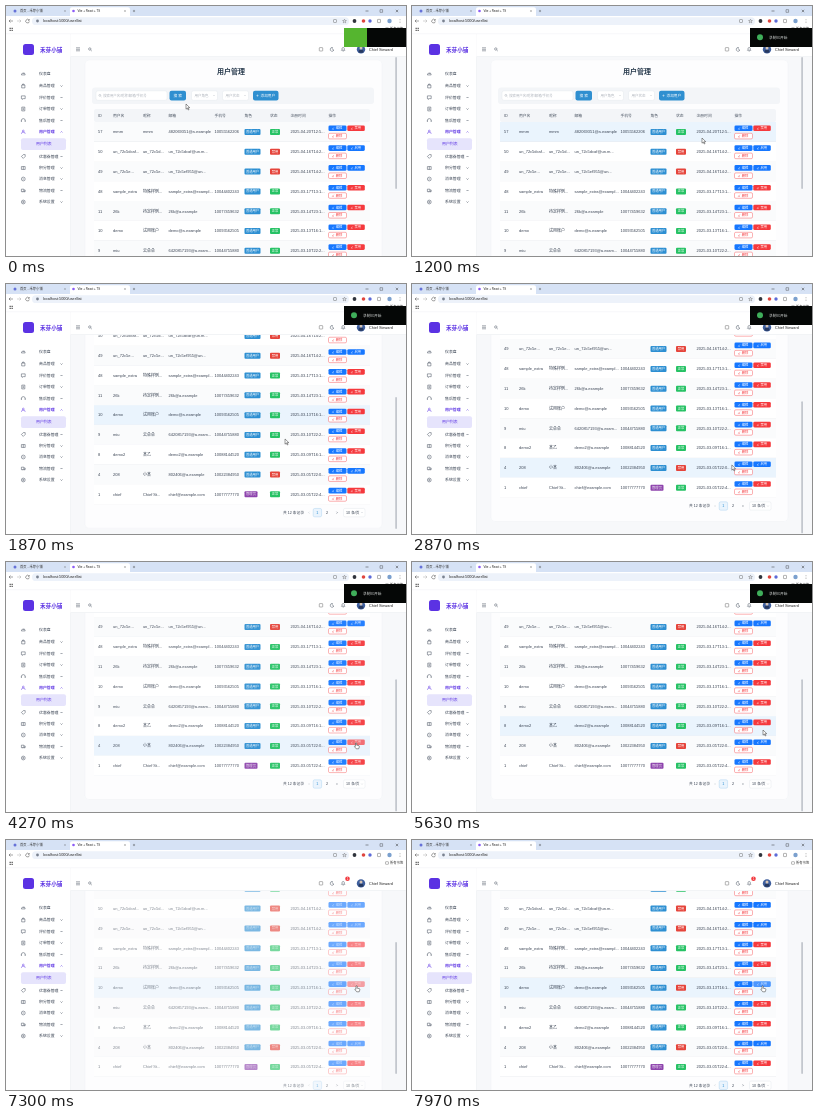
An HTML page with a canvas that plays this animation: 400 px wide and 250 px high, repeating every 8000 ms.

```html
<!DOCTYPE html>
<html lang="zh">
<head>
<meta charset="utf-8">
<title>用户管理</title>
<style>
html, body { margin: 0; width: 100%; height: 100%; overflow: hidden; background: #fff; }
canvas { display: block; width: 100vw; height: 100vh; }
</style>
</head>
<body>
<canvas id="stage"></canvas>
<script>
const canvas = document.getElementById('stage');
const ctx = canvas.getContext('2d');
const LOOP = 8000, W = 400, H = 250;
const FONT = '"Liberation Sans", "Noto Sans CJK SC", "Noto Sans CJK", sans-serif';
const BLUE = '#1677ff', RED = '#f5393d', PURPLE = '#5b32e3', INK = '#374151', GRAY = '#9aa1ac';
const ROW0 = 126, PITCH = 19.8, VIEW_TOP = 51;
const COLUMNS = [92, 107, 136.9, 162.5, 208.5, 238.5, 264, 284.5, 322.5];
const HEADINGS = ['ID', '用户名', '昵称', '邮箱', '手机号', '角色', '状态', '注册时间', '操作'];
const USERS = [
  ['57', 'mmm', 'mmm', '482069351@a.example', '10055562206', '04-20T12:5'],
  ['50', 'un_72c5dcaf...', 'un_72c5d...', 'un_72c5dcaf@un.m...', '', '04-16T14:2'],
  ['49', 'un_72c5e...', 'un_72c5e...', 'un_72c5ef955@un...', '', '04-16T14:2'],
  ['48', 'sample_extra', '特殊样例...', 'sample_extra@exampl...', '10044402243', '03-17T13:1'],
  ['11', '26k', '待定样例...', '26k@a.example', '10077459632', '03-14T23:1'],
  ['10', 'demo', '试用账户', 'demo@a.example', '10093562505', '03-13T16:1'],
  ['9', 'miu', '云朵朵', '6420857193@a.exam...', '10044755880', '03-10T22:2'],
  ['8', 'demo2', '某乙', 'demo2@a.example', '10088144520', '03-09T16:1'],
  ['4', '208', '小某', '802406@a.example', '10022384950', '03-05T22:0'],
  ['1', 'chief', 'Chief St...', 'chief@example.com', '10077777770', '03-05T22:4'],
];
const MENU = [
  ['仪表盘', 67.5], ['商品管理', 80], ['评价管理', 91.5], ['订单管理', 103], ['售后管理', 114.5],
  ['用户管理', 126], ['优惠券管理', 150.5], ['积分管理', 162], ['消息管理', 173], ['物流管理', 184.5], ['系统设置', 196],
];
const ICONS = [
  'M-2 1.5A2 2 0 1 1 2 1.5ZM0 .5L1-.7', 'M-1.7-1H1.7V2H-1.7ZM-.8-1V-2H.8V-1', 'M-2-1.7H2V1.2H0L-1 2V1.2H-2Z',
  'M-1.6-2H1.6V2H-1.6ZM-.8-.7H.8M-.8.6H.8', 'M-2 1V0A2 2 0 0 1 2 0V1M-2 0V1.4M2 0V1.4', 'M-1-1A1 1 0 1 1 1-1A1 1 0 1 1-1-1M-2 2A2 2 0 0 1 2 2',
  'M-2 0L0-2H2V0L0 2Z', 'M-2-1.5H2V1.5H-2ZM0-1.5V1.5', 'M-2 0A2 2 0 1 1 2 0A2 2 0 1 1-2 0M-.8 0H.8',
  'M-2-1.4H.6V1.2H-2ZM.6-.5H2V1.2H.6M-1 1.2V1.8M1 1.2V1.8', 'M-2 0A2 2 0 1 1 2 0A2 2 0 1 1-2 0M-.7 0A.7.7 0 1 1 .7 0A.7.7 0 1 1-.7 0',
].map(d => new Path2D(d));

const SCROLL = [[0, 0], [1500, 0], [1940, 100.5], [5850, 100.5], [6250, 77.2]];
const CURSOR_X = [[0, 180], [500, 196], [1200, 290], [1550, 281], [1900, 279], [2500, 309], [2700, 312], [3250, 346], [3400, 350],
  [5250, 350], [5600, 351], [5850, 351], [6400, 332], [6600, 332], [7050, 350.5]];
const CURSOR_Y = [[0, 98], [500, 104], [1200, 132], [1550, 153], [1900, 155], [2500, 181], [5250, 181], [5550, 168],
  [5850, 168], [6400, 183], [6600, 183], [7050, 146]];
const HOVERED = [[0, -1], [850, 0], [1580, 5], [2050, 7], [2330, 8], [5420, 7], [6760, 6], [6900, 5]];
const LOADS = [[3600, 4060], [4950, 5250], [7150, 7600]];

const clamp = v => Math.max(0, Math.min(1, v));
const ease = v => v * v * (3 - 2 * v);
const step = (keys, t) => keys.filter(k => k[0] <= t).pop()[1];
function tween(keys, t) {
  const i = keys.findIndex(k => k[0] > t);
  if (i < 0) return keys[keys.length - 1][1];
  const [t0, a] = keys[i - 1], [t1, b] = keys[i];
  return a + (b - a) * ease((t - t0) / (t1 - t0));
}

function box(x, y, w, h, fill, radius = 0, stroke) {
  ctx.beginPath();
  ctx.roundRect(x, y, w, h, radius);
  if (fill) { ctx.fillStyle = fill; ctx.fill(); }
  if (stroke) { ctx.strokeStyle = stroke; ctx.lineWidth = .4; ctx.stroke(); }
}
function dot(x, y, r, fill) {
  ctx.beginPath();
  ctx.arc(x, y, r, 0, 7);
  ctx.fillStyle = fill;
  ctx.fill();
}
function text(str, x, y, size = 4, color = INK, align = 'left', weight = 'normal') {
  ctx.font = `${weight} ${size}px ${FONT}`;
  ctx.textAlign = align;
  ctx.textBaseline = 'middle';
  ctx.fillStyle = color;
  ctx.fillText(str, x, y + size * .05);
}
function icon(path, x, y, color = '#4b5563', scale = 1, width = .5) {
  ctx.save();
  ctx.translate(x, y);
  ctx.scale(scale, scale);
  ctx.strokeStyle = color;
  ctx.lineWidth = width;
  ctx.stroke(typeof path === 'string' ? new Path2D(path) : path);
  ctx.restore();
}
const CHEVRON = 'M-1-.5L0 .5L1-.5', CROSS = 'M-1-1L1 1M1-1L-1 1', PLUS = 'M-1.4 0H1.4M0-1.4V1.4';
const LENS = 'M-1.4-.3A1.2 1.2 0 1 1 1-.3A1.2 1.2 0 1 1-1.4-.3M.7.7L1.8 1.8';

function browser() {
  box(0, 0, W, 10, '#d6e2f5');
  box(64, 1.2, 60, 10, '#fff', 2);
  dot(9, 5, 1.5, '#6672d8');
  text('首页 - 禾芽小铺', 14, 5, 3.3, '#333');
  dot(67.5, 5, 1.3, '#8b5cf6');
  text('Vite + React + TS', 71.5, 5, 2.9, '#222');
  icon(CROSS, 59, 5, '#555', .7);
  icon(CROSS, 119, 5, '#333', .7);
  icon(PLUS, 128, 5, '#333', .8);
  icon('M-1.5 0H1.5', 361, 5, '#333');
  box(374, 3.7, 2.6, 2.6, null, 0, '#333');
  icon(CROSS, 391, 5, '#333', 1.2, .4);
  box(0, 10, W, 18, '#fff');
  box(26, 11.3, 317, 7.8, '#edf2fa', 4);
  icon('M2 0H-2M-.5-1.5L-2 0L-.5 1.5', 5, 15, '#444');
  icon('M-2 0H2M.5-1.5L2 0L.5 1.5', 13, 15, '#aaa');
  icon('M1.4-1A1.8 1.8 0 1 0 1.8.4M1.8-2V-.7H.5', 21.5, 15, '#444');
  dot(31.5, 15, 1.4, '#7a8290');
  text('localhost:5000/user/list', 37, 15, 3.8, '#222');
  box(327.5, 13.5, 3, 3, null, .5, '#555');
  icon('M0-1.8L.6-.5L1.9-.4L.9.5L1.2 1.8L0 1.1L-1.2 1.8L-.9.5L-1.9-.4L-.6-.5Z', 338.5, 15, '#555', 1, .4);
  dot(348.5, 15, 1.9, '#30343c');
  dot(357.5, 15, 1.8, '#df453e');
  dot(364, 15, 1.7, '#5d6bd8');
  box(371.5, 13.4, 3, 3.2, null, .4, '#444');
  dot(383.5, 15, 2.2, '#7ba0ce');
  for (const dy of [-1.4, 0, 1.4]) dot(394, 15 + dy, .35, '#444');
  for (const dx of [0, 2]) for (const dy of [0, 2]) box(3.5 + dx, 21.7 + dy, 1.4, 1.4, '#666');
  box(379.5, 21.7, 3, 2.6, null, .4, '#555');
  text('所有书签', 384, 23.2, 3.3, '#333');
  box(0, 27.8, W, .4, '#e5e8ed');
}

function sidebar() {
  box(0, 28.2, 64, 222, '#fff');
  box(64, 28.2, .4, 222, '#e3e6ec');
  box(17, 38, 11, 11, PURPLE, 2.5);
  text('禾芽小铺', 34, 44, 5.6, PURPLE, 'left', 'bold');
  box(15, 132.3, 45, 11.6, '#e6e4fc', 2);
  text('用户列表', 30, 138.2, 3.9, PURPLE);
  MENU.forEach(([label, y], i) => {
    const active = i === 5, color = active ? PURPLE : INK;
    icon(ICONS[i], 17.3, y, color, .95);
    text(label, 33, y, 3.9, color, 'left', active ? 'bold' : 'normal');
    if (i) icon(CHEVRON, 55.5, y, color, active ? -1 : 1);
  });
}

function header() {
  box(64.4, 28.2, 335.6, VIEW_TOP - 28.2, '#fff');
  box(64.4, VIEW_TOP - .4, 335.6, .4, '#e6e9ee');
  icon('M-2-1.5H2M-2 0H2M-2 1.5H2', 72, 43.3);
  icon(LENS, 84, 43.3);
  box(313.3, 41.6, 3.4, 3.4, null, .5, '#444');
  icon('M.5-1.8A1.9 1.9 0 1 0 1.9.7A1.6 1.6 0 0 1 .5-1.8Z', 326, 43.3);
  icon('M-1.8 1H1.8L1.2.3V-.6A1.2 1.2 0 0 0-1.2-.6V.3ZM-.5 1.9H.5', 337.2, 43.3);
  dot(341.5, 38.8, 2.3, '#f23b40');
  text('1', 341.5, 38.8, 3, '#fff', 'center');
  dot(355, 43.4, 4.2, '#3f5f9d');
  dot(355, 42, 1.5, '#d6c4b5');
  box(352.6, 44, 4.8, 2.8, '#27395f', 1.4);
  text('Chief Steward', 363, 43.5, 3.8, '#222');
}

function filters() {
  text('用户管理', 225, 66.2, 7, '#2c3e50', 'center', 'bold');
  box(86, 81.5, 282, 16.5, '#f3f5f8', 3);
  box(90, 84.8, 71, 9.6, '#fff', 2, '#dfe3e8');
  icon(LENS, 94, 89.6, GRAY, .8);
  text('搜索用户名/昵称/邮箱/手机号', 97.2, 89.6, 3.4, '#b1b6be');
  box(163.5, 84.8, 16.5, 9.6, '#2f8fd0', 2);
  text('搜 索', 171.8, 89.6, 3.8, '#fff', 'center');
  [[185.5, '用户角色'], [216.5, '用户状态']].forEach(([x, label]) => {
    box(x, 84.8, 26, 9.6, '#fff', 2, '#dfe3e8');
    text(label, x + 3, 89.6, 3.5, '#b1b6be');
    icon(CHEVRON, x + 22.5, 89.6, '#b1b6be', .8);
  });
  box(247, 84.8, 25.5, 9.6, '#2f8fd0', 2);
  icon(PLUS, 251.5, 89.6, '#fff', .8);
  text('添加用户', 254.5, 89.6, 3.7, '#fff');
}

function tag(label, x, y, w, color) {
  box(x, y - 3, w, 6, color, 1);
  text(label, x + w / 2, y, 3.3, '#fff', 'center');
}
function button(label, x, y, w, color, mouse, outlined) {
  const hot = mouse.x > x && mouse.x < x + w && Math.abs(mouse.y - y) < 2.9;
  ctx.save();
  if (hot) { mouse.hand = true; ctx.globalAlpha *= .75; }
  box(x, y - 2.8, w, 5.6, outlined ? '#fff' : color, 1.3, outlined && color);
  const ink = outlined ? color : '#fff';
  icon('M-1 1L1-1M-1 1.2H1', x + 4.6, y, ink, .8);
  text(label, x + 7.2, y, 3.3, ink);
  ctx.restore();
}

function isEnabled(index, t) {
  if (index === 1 || index === 2) return false;
  if (index === 8) return t >= LOADS[0][1] && t < LOADS[1][1];
  return index !== 5 || t < LOADS[2][1];
}

function table(t, mouse) {
  const hovered = step(HOVERED, t);
  box(88, 103, 276, 13.1, '#f3f5f8', 2);
  HEADINGS.forEach((label, i) => text(label, COLUMNS[i], 109.7, 3.8, '#4b5563'));
  USERS.forEach(([id, name, nick, mail, phone, date], i) => {
    const y = ROW0 + i * PITCH, enabled = isEnabled(i, t);
    box(88, y - PITCH / 2, 276, PITCH, i === hovered ? '#eaf4fd' : i % 2 ? '#fff' : '#fafbfc');
    box(88, y + PITCH / 2 - .3, 276, .3, '#e9ecf0');
    [id, name, nick, mail, phone].forEach((value, c) => text(value, COLUMNS[c], y, 4));
    text(`2025-${date}...`, COLUMNS[7], y, 4);
    if (i === 9) tag('管理员', 238.5, y, 13, '#8e44ad');
    else tag('普通用户', 238.5, y, 16, '#2d8fd2');
    tag(enabled ? '正常' : '禁用', 264, y, 10, enabled ? '#27c265' : '#e5443b');
    button('编辑', 322.5, y - 3.7, 18, BLUE, mouse);
    button(enabled ? '禁用' : '启用', 341.3, y - 3.7, 17.5, enabled ? RED : BLUE, mouse);
    button('删除', 322.5, y + 4.1, 18, RED, mouse, true);
  });
  const y = 322.5;
  text('共 12 条记录', 277, y, 3.7);
  icon('M.5-1L-.5 0L.5 1', 303, y, '#b8bec7', .9);
  box(307.2, y - 4.2, 8.4, 8.4, '#eaf4fd', 1.5, '#9ccbee');
  text('1', 311.4, y, 3.8, '#2d8fd2', 'center');
  text('2', 321, y, 3.8, INK, 'center');
  icon('M-.5-1L.5 0L-.5 1', 331, y, INK, .9);
  box(337.5, y - 4.2, 21.5, 8.4, '#fff', 1.5, '#dfe3e8');
  text('10 条/页', 340, y, 3.7);
  icon(CHEVRON, 356, y, GRAY, .7);
}

function tableOpacity(t) {
  return 1 - .5 * Math.max(...LOADS.map(([a, b]) => clamp((t - a) / 200) * (1 - clamp((t - b) / 240))));
}

function content(t, mouse) {
  const scroll = tween(SCROLL, t);
  ctx.save();
  ctx.beginPath();
  ctx.rect(64.4, VIEW_TOP, 335.6, H - VIEW_TOP);
  ctx.clip();
  box(64.4, VIEW_TOP, 335.6, 199, '#f7f8fa');
  ctx.translate(0, -scroll);
  box(79, 54, 297, 284, '#fdfdfe', 4, '#eceff3');
  filters();
  ctx.globalAlpha = tableOpacity(t);
  mouse.y += scroll;
  table(t, mouse);
  mouse.y -= scroll;
  ctx.restore();
  box(389.2, VIEW_TOP + scroll * .66, 1.8, 132, '#c3c7ce', .9);
}

function recorderNotice(t) {
  const x = 338 + 62 * ease(clamp((t - 5850) / 300));
  if (x >= W) return;
  box(x, 22, 62, 19, '#050706');
  const green = 23 * (1 - ease(clamp((t - 30) / 350)));
  if (green > 0) box(x, 22, green, 19, '#55b52f');
  ctx.save();
  ctx.globalAlpha = clamp((t - 300) / 200);
  dot(x + 10, 31.3, 3, '#3fae5a');
  text('录制已开始', x + 19, 31.3, 3.7, '#dcdfdd');
  ctx.restore();
}

function pointer({ x, y, hand }) {
  const arrow = 'M0 0V5.2L1.3 4L2.2 6L3 5.6L2.1 3.7H3.8Z';
  const glove = 'M-.5 0Q.2-.6.7 0V2.2L3 2.7Q3.5 3 3.3 4L2.7 5.8H.2L-1.7 3.4Q-1.4 2.7-.5 3.3Z';
  const shape = new Path2D(hand ? glove : arrow);
  ctx.save();
  ctx.translate(x, y);
  ctx.fillStyle = '#fff';
  ctx.strokeStyle = '#333';
  ctx.lineWidth = .5;
  ctx.fill(shape);
  ctx.stroke(shape);
  ctx.restore();
}

function draw() {
  const t = performance.now() % LOOP;
  const ratio = devicePixelRatio || 1;
  const width = Math.round(innerWidth * ratio), height = Math.round(innerHeight * ratio);
  if (canvas.width !== width || canvas.height !== height) Object.assign(canvas, { width, height });
  ctx.setTransform(width / W, 0, 0, height / H, 0, 0);
  const mouse = { x: tween(CURSOR_X, t), y: tween(CURSOR_Y, t), hand: false };
  box(0, 0, W, H, '#fff');
  content(t, mouse);
  browser();
  sidebar();
  header();
  recorderNotice(t);
  pointer(mouse);
  requestAnimationFrame(draw);
}
draw();
</script>
</body>
</html>
```
